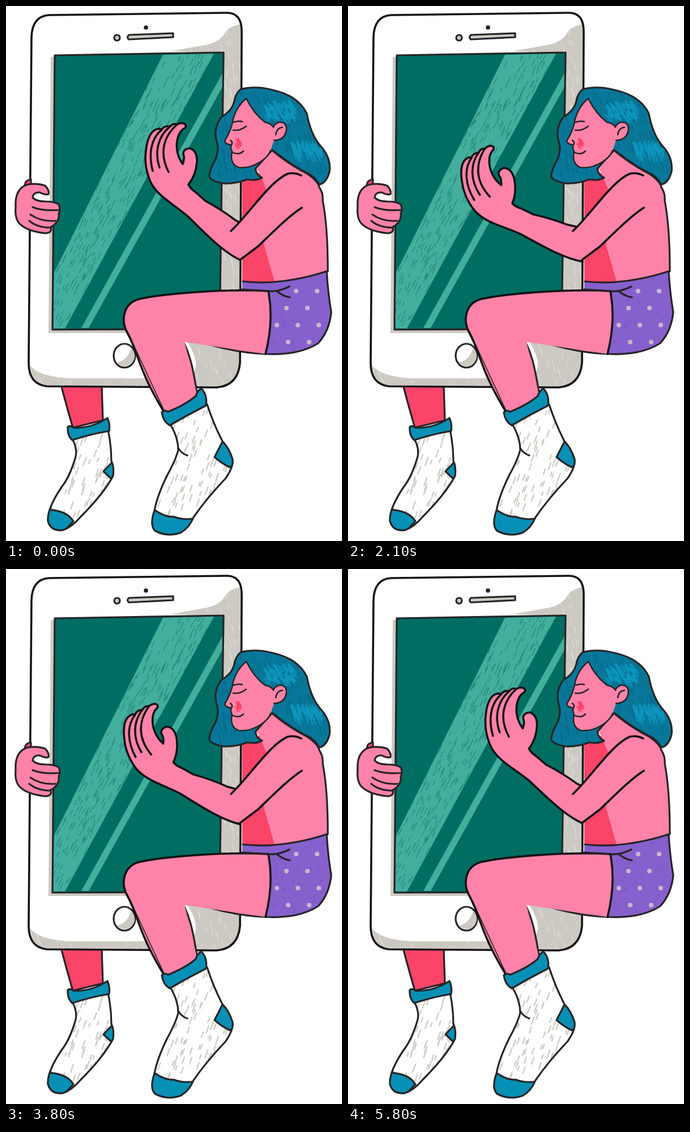
An HTML page that plays this animation: 593 px wide and 944 px high, repeating every 6 s.

```html
<!DOCTYPE html>
<html lang="en">
<head>
<meta charset="utf-8">
<title>Phone hug</title>
<style>
html, body { margin: 0; width: 100%; height: 100%; overflow: hidden; background: #fff; }
svg { display: block; width: 593px; height: 944px; }
.ln { fill: none; stroke: #262326; stroke-width: 3.2; stroke-linecap: round; stroke-linejoin: round; }
.bold { stroke: #151315; stroke-width: 3.6; }
.fine { stroke-width: 2.5; }
.pink { fill: #ff83a8; }
.red { fill: #fa4468; }
.blue { fill: #0790b5; }
.hair { fill: #07789a; }
.white { fill: #fff; }
.grey { fill: #cbc9c1; }
.purple { fill: #8660cc; }
.glass { fill: #006d63; }
.glare { fill: #43ae9d; }
.hatch { fill: none; stroke-linecap: round; }
</style>
</head>
<body>
<svg viewBox="0 0 593 944">
<defs>
  <path id="phone" d="M76 16L390 12Q416 12 416 45L413 630Q409 670 372 673L72 671Q40 667 40 630L45 55Q46 18 76 16Z"/>
  <path id="shade" d="M414 32Q392 36 385 50Q375 66 345 70L290 80L385 82L377 500V604Q355 596 316 586Q352 640 320 657H120Q60 656 42 634Q44 665 72 669L372 671Q409 670 412 630Z"/>
  <path id="beam" d="M277 86L367 84L104 569H82L85 470Z"/>
  <path id="hair" d="M414 147Q440 140 470 148Q516 158 531 190Q538 228 556 248Q574 268 571 292Q566 312 553 315Q545 300 530 294Q498 277 470 254L440 287Q442 299 452 303Q441 309 426 306Q404 314 384 313Q356 308 359 297Q361 286 369 272Q377 254 372 239Q365 216 380 196Q400 184 403 167Q406 153 414 147Z"/>
  <path id="sockL" d="M117 764Q126 780 123 795Q113 830 98 849Q72 888 74 909Q79 927 100 925Q116 920 132 901Q173 860 189 829Q191 812 186 803Q186 775 180 748Z"/>
  <path id="sockR" d="M290 738Q304 762 304 783Q300 800 284 829Q267 864 262 890Q253 916 263 926Q285 938 309 929Q324 920 331 902Q353 870 388 833Q402 812 400 800Q394 780 382 768Q366 737 355 703Z"/>
  <path id="shorts" d="M417 486Q455 490 492 485Q530 480 566 468Q568 505 574 540Q571 573 551 595Q517 617 458 614Q473 555 463 503L417 499Z"/>
</defs>

<!-- far leg -->
<path class="ln red" d="M98 672Q108 710 118 744L171 731L169 671"/>
<use href="#sockL" class="white"/>
<g id="sockLTex"></g>
<path class="ln blue" clip-path="url(#cut-sockL)" d="M195 797L172 821L195 843ZM60 889Q104 886 119 909L90 940H60Z"/>
<use href="#sockL" class="ln"/>
<path class="ln blue" d="M109 743Q113 739 119 744Q150 746 179 727Q184 737 182 750Q150 755 117 766Q108 758 109 743Z"/>

<!-- phone -->
<use href="#phone" class="white"/>
<use href="#shade" class="grey"/>
<g id="shadeTex"></g>
<path fill="none" stroke="#cbc9c1" stroke-width="6" d="M82 90L78 574H215"/>
<use href="#phone" class="ln bold"/>
<path class="glass" d="M86 87L384 82L377 570L82 571Z"/>
<use href="#beam" class="glare"/>
<g id="beamTex"></g>
<path class="glare" d="M383 117V141L146 568H133Z"/>
<path class="ln" d="M86 87L384 82L377 570L82 571Z"/>
<circle class="ln grey" cx="196" cy="56" r="5"/>
<circle cx="247" cy="38" r="3.8" fill="#222"/>
<path class="ln grey" d="M217 51L295 48V55L217 59Q212 55 217 51Z"/>
<ellipse class="ln white" cx="209" cy="617" rx="19" ry="21"/>
<path class="grey" d="M196 629Q214 626 221 603Q235 620 218 634Q205 639 196 629Z"/>

<!-- far hand -->
<path class="ln red" d="M33 316Q34 307 44 306V315Z"/>
<path class="ln pink" d="M38 315Q55 312 69 317Q77 325 75 332Q68 334 60 329Q48 328 47 338Q54 345 70 345Q86 345 93 350Q97 358 93 366Q95 374 88 383Q84 388 79 390Q82 400 70 401Q40 398 26 386Q15 377 17 355Q15 322 38 315Z"/>
<path class="ln" d="M47 355Q65 362 93 360M43 368Q62 381 87 379M41 379Q55 391 79 391"/>

<!-- torso -->
<path class="red" d="M417 303L447 294L500 400L480 488H417Z"/>
<path class="pink" d="M447 294L440 286L470 254L553 318L568 470L475 490L455 420L463 333Z"/>
<path class="ln pink" d="M470 255Q500 280 530 295Q551 309 553 320Q560 330 559 343Q568 390 568 468"/>

<!-- shorts -->
<use href="#shorts" class="purple"/>
<g id="shortsTex"></g>
<g id="dots" fill="#c6b8cc"></g>
<path class="ln" d="M418 486Q455 490 492 485Q530 480 566 468Q568 505 574 540Q571 573 551 595Q517 617 458 614M463 503Q480 505 500 495M478 503Q488 512 501 514"/>

<!-- head -->
<use href="#hair" class="hair"/>
<g id="hairTex"></g>
<use href="#hair" class="ln"/>
<path class="ln pink fine" d="M467 255Q463 266 449 275Q430 287 411 285Q397 280 398 263Q400 256 397 252V245Q387 244 386 238Q398 219 401 199Q407 177 424 163Q437 190 457 205Q468 207 472 214Q474 207 482 205Q495 204 495 218Q492 237 473 237"/>
<g id="blush"></g>
<path class="ln fine" d="M476 227Q478 215 488 214M401 219Q413 221 424 212M402 205Q410 202 417 204M399 258Q411 264 419 256M396 237Q401 240 398 245"/>

<!-- near arm: only the forearm swings -->
<g id="arm">
  <path class="ln bold pink" d="M413 448C385 435 355 405 322 372C295 349 270 337 257 314C248 297 244 275 247 255C249 233 257 219 267 217Q272 215 274 219Q280 210 289 213Q295 206 302 209Q310 205 315 208Q319 211 316 215C302 222 299 244 303 260Q306 271 312 279Q316 267 313 262Q312 252 325 251Q338 256 337 275Q335 299 322 315Q325 322 334 328L352 344Q380 359 405 378L420 386"/>
  <path class="ln bold" d="M274 219C256 234 251 262 259 291M289 213C268 230 262 258 271 285M302 209C276 232 271 262 287 293"/>
  <circle cx="591" cy="454" r="1" fill="#ddd"/>
</g>
<path class="pink" d="M397 397L413 449L445 424L522 356L540 340L520 299L465 325Z"/>
<path class="ln bold pink" d="M397 397C430 366 465 310 497 296Q510 293 521 299"/>
<path class="ln bold pink" d="M413 448L445 424C475 395 500 370 522 356"/>

<!-- near leg -->
<path class="ln pink" d="M280 718L338 688C331 645 325 605 303 577Q308 580 316 583C360 600 410 612 458 614L463 503L235 517L215 578Z"/>
<path class="ln bold pink" d="M458 614Q473 555 463 503C380 498 270 509 235 517C206 525 202 556 215 578"/>
<path class="pink" d="M225 560L450 510L452 605L312 580L338 690L284 718L217 578Z"/>
<path class="ln bold pink" d="M215 578C234 612 232 640 280 718"/>
<path class="ln" d="M417 500L463 503"/>
<use href="#sockR" class="white"/>
<g id="sockRTex"></g>
<path class="ln blue" clip-path="url(#cut-sockR)" d="M390 753L368 796Q382 808 395 814L420 800ZM250 880Q278 903 296 901Q315 909 345 902V950H250Z"/>
<path class="ln" d="M304 780Q310 790 320 793"/>
<use href="#sockR" class="ln"/>
<path class="ln blue" d="M275 717Q280 712 286 716Q318 703 335 688Q338 678 345 675Q356 687 353 705Q321 721 289 740Q277 733 275 717Z"/>
</svg>

<script>
const SVG = 'http://www.w3.org/2000/svg';
const get = id => document.getElementById(id);
const defs = document.querySelector('defs');
let seed = 11;
const rnd = () => (seed = (seed * 16807) % 2147483647) / 2147483647;

function add(parent, tag, attrs) {
  const el = document.createElementNS(SVG, tag);
  for (const k in attrs) el.setAttribute(k, attrs[k]);
  return parent.appendChild(el);
}

// Random parallel strokes in a box.
function strokes(group, { x, y, width, height }, count, [dx, dy], stroke, weight, clip) {
  let d = '';
  for (let i = 0; i < count; i++) {
    const k = 0.4 + rnd() * 0.6;
    d += `M${x + rnd() * width} ${y + rnd() * height}l${dx * k} ${dy * k}`;
  }
  const path = add(get(group), 'path', { d, class: 'hatch', stroke, 'stroke-width': weight });
  if (clip) path.setAttribute('clip-path', `url(#cut-${clip})`);
}

// Strokes over a whole shape, cut to its outline.
const fillStrokes = (id, ...style) => strokes(id + 'Tex', get(id).getBBox(), ...style, id);

for (const shape of defs.querySelectorAll('path'))
  add(add(defs, 'clipPath', { id: 'cut-' + shape.id }), 'use', { href: '#' + shape.id });

fillStrokes('beam', 1100, [-7, 14], '#278677', 1.2);
fillStrokes('shade', 800, [4, 16], '#dddbd4', 1.4);
fillStrokes('sockL', 110, [-5, 14], '#cfcdc6', 2.4);
fillStrokes('sockR', 130, [-5, 14], '#cfcdc6', 2.4);
fillStrokes('shorts', 60, [-5, 7], '#7c55c2', 1.4);
fillStrokes('hair', 280, [5, 18], '#096a8a', 1.5);

// Two glossy bands on the hair, and the blush.
const box = (x, y, width, height) => ({ x, y, width, height });
strokes('hairTex', box(455, 168, 50, 26), 60, [10, 14], '#0c94bb', 2.4, 'hair');
strokes('hairTex', box(503, 238, 52, 24), 60, [5, 18], '#0c94bb', 2.4, 'hair');
strokes('blush', box(403, 233, 9, 12), 20, [5, 9], '#fa4468', 1.8);

// Staggered polka dots.
for (let row = 0; row < 4; row++)
  for (let col = 0; col < 3; col++) {
    const cx = 512 - 17 * row + 37 * col;
    if (cx > 475 && cx < 560) add(get('dots'), 'circle', { cx, cy: 503 + 30 * row, r: 4 });
  }

// The forearm lifts away with a slow start, then drifts back evenly.
const LOOP = 6000, STEP = 100, LAST = 5800, PEAK = 2500, SWING = 20.5;
const arm = get('arm');

function swing(ms) {
  const t = Math.min(Math.floor(ms / STEP) * STEP, LAST);
  return SWING * (t < PEAK ? (t / PEAK) ** 1.45 : (LOOP - t) / (LOOP - PEAK));
}

function draw() {
  arm.setAttribute('transform', `rotate(${-swing(performance.now() % LOOP)} 424 446)`);
  requestAnimationFrame(draw);
}
draw();
</script>
</body>
</html>
```
